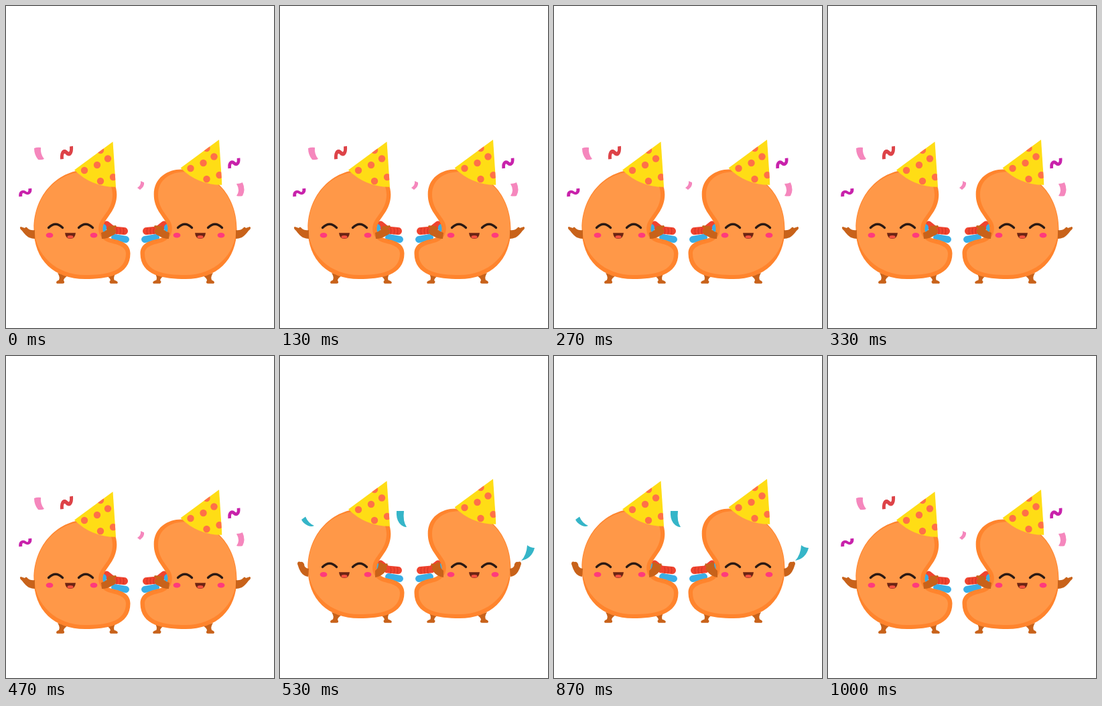
Animation of 400 by 480 pixels, one loop 1070 ms. Source, as an HTML page:

```html
<!DOCTYPE html>
<html lang="en">
<head>
<meta charset="utf-8">
<title>Party beans</title>
<style>
  html, body { margin: 0; width: 100%; height: 100%; overflow: hidden; background: #fff; }
  svg { display: block; width: 100vw; height: 100vh; }
  .limb { fill: #c8621a; }
  .ribbon { fill: none; stroke-width: 5; }
</style>
</head>
<body>
<svg viewBox="0 0 400 480">
  <defs>
    <clipPath id="cone"><path d="M159.500 202.300L102 244.500Q128 270 164 269.800Z"/></clipPath>

    <g id="hat" clip-path="url(#cone)">
      <path fill="#ffdd15" d="M90 195H175V280H90Z"/>
      <g fill="#ff7048">
        <circle cx="117" cy="245" r="5.2"/>
        <circle cx="136" cy="237" r="5.2"/>
        <circle cx="152" cy="227.500" r="5.2"/>
        <circle cx="141" cy="215" r="5.2"/>
        <circle cx="141" cy="261" r="5.2"/>
        <circle cx="160" cy="255" r="5.2"/>
      </g>
    </g>

    <g id="bean">
      <g class="limb">
        <path d="M77 398L92 402Q86 406 86 409Q89 413.500 84 413.800H76Q73 411 79 408.500Q81 404 77 398Z"/>
        <path d="M150 402L164 398Q160 404 161.500 408.500Q169 411 166 413.800H156Q153 411 156 409Q155 405 150 402Z"/>
      </g>
      <g fill="none" stroke-linecap="round">
        <path stroke="#f0442f" stroke-width="11" d="M150 326L160 334L176.500 335.500"/>
        <path stroke="#3aaee6" stroke-width="10" d="M145 330V332M162 345L179 348"/>
        <path stroke="#cf3424" stroke-width="1" d="M165 331q2 4 0 9M170 331q2 4 0 9M175 331q2 4 0 9"/>
      </g>
      <path fill="#ff842d" d="M124 243.500C78 243.500 41.500 281 41.500 332C41.500 379 72 407 118 407C150 407 185.500 402 185.500 369C185.500 354 172 350 158 347C146 344 141 334 147 323C152 313 165.300 302 165.300 281C165.300 256 145 243.500 124 243.500Z"/>
      <path fill="#ff9848" d="M124 247.500C79 244 42.500 282 42.500 331C42.500 371 75 401 118 401C148 401 179 397 179 369C179 359 168 356 156 353C138 348 135 332 141 321C148 309 159 300 159 281C159 260 143 249 124 247.500Z"/>
      <g fill="none" stroke="#2b1a14" stroke-width="3.300" stroke-linecap="round">
        <path d="M63.500 330.500Q74 320 84.500 330.500"/>
        <path d="M108.500 330.500Q119 320 129.500 330.500"/>
      </g>
      <g fill="#ff3a7c">
        <ellipse cx="65" cy="341.700" rx="5.400" ry="3.800"/>
        <ellipse cx="131" cy="341.700" rx="5.400" ry="3.800"/>
      </g>
      <path fill="#6b2413" d="M88 338.300H104Q103 347 96 347Q89 347 88 338.300Z"/>
      <ellipse cx="96" cy="344.300" rx="4.500" ry="2.300" fill="#f4513f"/>
    </g>

    <g id="armsDown" class="limb">
      <path d="M43 334Q36 335 32 331Q30 328 28 331L22 329Q19 331 24 335Q29 342 34 345Q39 347 43 347Z"/>
      <path d="M142 338Q148 336 151 333Q152 327 156 328L164 327Q167 330 160 332Q166 334 164 337Q163 341 159 342Q152 347 143 347Z"/>
    </g>
    <g id="armsUp" class="limb">
      <path d="M43 317Q36 316 36 310Q34 306 31 307Q26 305 26 310Q28 317 31 322Q35 328 42 329Z"/>
      <path d="M142 320Q147 317 147 310Q148 305 152 308Q155 312 160 309Q162 312 158 315Q161 317 158 320Q153 328 142 330Z"/>
    </g>

    <path id="curl" d="M-7 8C-8 -2 -3 -3 0 0S8 2 7 -8"/>
  </defs>

  <g id="bodies">
    <use href="#bean"/>
    <use href="#bean" transform="matrix(-1 0 0 1 386 0)"/>
    <use href="#hat"/>
    <use href="#hat" x="158.500" y="-3"/>
  </g>

  <g id="low">
    <use href="#armsDown"/>
    <use href="#armsDown" transform="matrix(-1 0 0 1 386 0)"/>
    <g class="ribbon">
      <use href="#curl" stroke="#dd4348" transform="translate(90.500 218.700) scale(1 1.200)"/>
      <use href="#curl" stroke="#c822ab" transform="translate(28.800 278) scale(1 .75)"/>
      <use href="#curl" stroke="#c822ab" transform="translate(340.400 234.300) scale(.95 .95)"/>
    </g>
    <g fill="#f587bd">
      <path d="M42 212Q47 210 52 211Q51 221 57 228Q53 230 48 229Q42 222 42 212Z"/>
      <path d="M201 261L206 263Q207 269 200 274L196 271Q202 267 201 261Z"/>
      <path d="M344 265Q349 265 353 263Q358 274 353 283Q349 284 344 283Q350 275 344 265Z"/>
    </g>
  </g>

  <g id="high">
    <use href="#armsUp"/>
    <use href="#armsUp" transform="matrix(-1 0 0 1 386 0)"/>
    <g fill="#35b5c8">
      <path d="M32 244L38 239.500Q42 249 51 253Q47 255 42 253Q35 250 32 244Z"/>
      <path d="M174 231H185Q183 246 189 255Q183 255 178 249Q173 242 174 231Z"/>
      <path d="M369 282Q374 286 380 286Q376 302 360 305Q368 297 369 282Z"/>
    </g>
  </g>
</svg>
<script>
  const LOOP = 1070, JUMP = 530, LAND = 1000;

  // Holds `down`, switches to `up` for the jump, then back.
  function hold(id, prop, down, up) {
    const steps = [[0, down], [JUMP, up], [LAND, down], [LOOP, down]];
    const frames = steps.map(([t, v]) => ({ offset: t / LOOP, [prop]: v, easing: 'step-end' }));
    document.getElementById(id).animate(frames, { duration: LOOP, iterations: Infinity }).startTime = 0;
  }

  hold('bodies', 'transform', 'translateY(0px)', 'translateY(-16px)');
  hold('low', 'visibility', 'visible', 'hidden');
  hold('high', 'visibility', 'hidden', 'visible');
</script>
</body>
</html>
```
